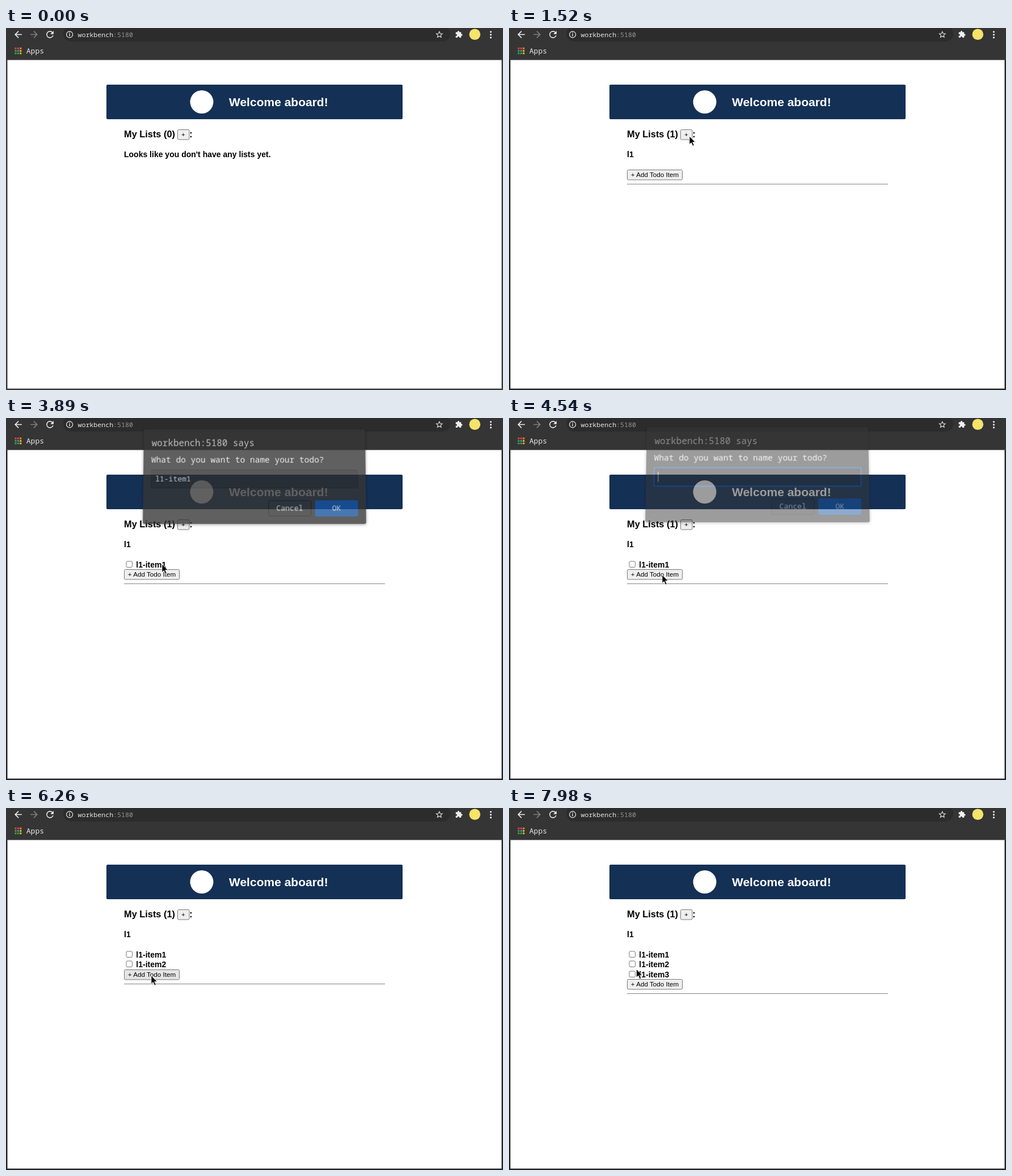
An HTML page that plays this animation: 876x639 px, repeating every 8 s.

```html
<!DOCTYPE html>
<html lang="en">
<head>
<meta charset="utf-8">
<title>Todo lists</title>
<style>
  html, body { margin: 0; width: 100%; height: 100%; overflow: hidden; background: #fff; }
  #stage { position: absolute; inset: 0; overflow: hidden; contain: strict; }
  svg { position: absolute; left: 0; top: 0; display: block; }
  text { white-space: pre; }
  .mono { font-family: "Noto Sans Mono", "DejaVu Sans Mono", monospace; fill: #e8e8e8; }
  .sans { font-family: "Liberation Sans", Arial, sans-serif; }
  .bold { font-weight: bold; font-size: 14px; }
  .h3 { font-size: 16.38px; }
  .label { font-size: 11.67px; text-anchor: middle; }
  .btn { fill: #efefef; stroke: #767676; }
  .box { fill: #fff; stroke: #767676; }
  .small { font-size: 13px; }
  .mid { text-anchor: middle; }
  #dialog { left: 228px; top: 16px; transform-origin: 50% 10px; }
  #panel { filter: drop-shadow(0 1px 2.5px rgba(0,0,0,.5)); }
</style>
</head>
<body>
<div id="stage">
<svg width="876" height="639">
  <rect id="frame" width="876" height="639"/>
  <rect width="876" height="57" fill="#353535"/>
  <rect x="101" y="-4" width="682" height="28" rx="14" fill="#2c2c2c"/>
  <rect x="2.5" y="56.5" width="871" height="580" fill="#fff"/>

  <g fill="#f0f0f0">
    <path transform="translate(11.9 1.9) scale(.8)" d="M20 11H7.8l5.6-5.6L12 4l-8 8 8 8 1.4-1.4L7.8 13H20z"/>
    <path transform="translate(59.1 1.9) scale(-.8 .8)" fill="#808080" d="M20 11H7.8l5.6-5.6L12 4l-8 8 8 8 1.4-1.4L7.8 13H20z"/>
    <path transform="translate(67.9 1.9) scale(.8)" d="M17.65 6.35A8 8 0 0 0 12 4a8 8 0 1 0 7.73 10h-2.08A6 6 0 1 1 12 6c1.66 0 3.14.69 4.22 1.78L13 11h7V4z"/>
    <path d="M111.4 10.5h1.4v4h-1.4zM111.4 8h1.4v1.5h-1.4z"/>
    <path transform="translate(791.5 4.5) scale(.57)" d="M20.5 11H19V7c0-1.1-.9-2-2-2h-4V3.5a2.5 2.5 0 0 0-5 0V5H4c-1.1 0-2 .9-2 2v3.8h1.5a2.7 2.7 0 0 1 0 5.4H2V20c0 1.1.9 2 2 2h3.8v-1.5a2.7 2.7 0 0 1 5.4 0V22H17c1.1 0 2-.9 2-2v-4h1.5a2.5 2.5 0 0 0 0-5z"/>
    <circle cx="854.5" cy="6.8" r="1.6"/><circle cx="854.5" cy="11.8" r="1.6"/><circle cx="854.5" cy="16.8" r="1.6"/>
  </g>
  <g fill="none" stroke="#e0e0e0">
    <circle cx="112.1" cy="11.5" r="5.5" stroke-width="1.3"/>
    <path transform="translate(757.4 5) scale(.53)" stroke-width="2.2" d="M12 2.5l2.9 6.6 7.1.6-5.4 4.7 1.6 7-6.2-3.7-6.2 3.7 1.6-7L2 9.7l7.1-.6z"/>
  </g>
  <circle cx="826.3" cy="11.3" r="9.8" fill="#f5e36a"/>
  <g id="grid"></g>
  <text class="mono" x="126.5" y="15.8" font-size="11.6">workbench<tspan fill="#969696">:5180</tspan></text>
  <text class="mono small" x="35.8" y="45">Apps</text>

  <rect x="177" y="100" width="522" height="61" rx="2" fill="#143055"/>
  <circle cx="345" cy="130.5" r="20.5" fill="#fff"/>
  <text class="sans bold" x="393" y="138" fill="#fff" style="font-size:21px">Welcome aboard!</text>

  <g class="sans">
    <text id="heading" class="bold h3" x="208" y="193"></text>
    <rect class="btn" x="302.5" y="179.5" width="20.5" height="17.5" rx="2"/>
    <text class="label" x="312.5" y="192.3">+</text>
    <text class="bold h3" x="323.2" y="193">:</text>
    <text id="sub" class="bold" x="208" y="228"></text>
    <g id="items"></g>
    <g id="footer">
      <rect id="add" class="btn" x="208.5" y="250.5" width="97" height="17.5" rx="2"/>
      <text class="label" x="257" y="263">+ Add Todo Item</text>
      <rect x="208" y="275" width="460" height="1.1" fill="#8c8c8c"/>
    </g>
  </g>
</svg>

<svg id="dialog" width="420" height="190" viewBox="228 16 420 190">
  <rect id="panel" x="243" y="26" width="390" height="166" rx="3" fill="#343434"/>
  <text class="mono" x="257" y="56" font-size="15.9">workbench:5180 says</text>
  <text id="prompt" class="mono" x="256.5" y="85" font-size="14.48"></text>
  <rect id="input" x="257" y="97.5" width="362" height="32" rx="2" fill="#2c2c2c"/>
  <text id="value" class="mono small" x="264" y="118"></text>
  <rect id="caret" y="104.5" width="1" height="17.5" fill="#fff"/>
  <rect x="462.5" y="151.5" width="74.5" height="27" rx="3" fill="#333" stroke="#1b1b1b"/>
  <text class="mono small mid" x="499.5" y="169">Cancel</text>
  <rect x="544" y="151" width="75" height="28" rx="3" fill="#15539e"/>
  <text class="mono small mid" x="581.5" y="169">OK</text>
</svg>

<svg width="876" height="639">
  <path id="cursor" d="M0 0V14.5L3.3 11.4 5.9 17.2 8.3 16.1 5.7 10.4H10.3Z" fill="#000" stroke="#fff" stroke-width=".8"/>
</svg>
</div>

<script>
const LOOP = 8000;
const $ = id => document.getElementById(id);
const clamp = (v, a, b) => Math.min(b, Math.max(a, v));
const rowOffset = n => Math.floor(n * 17.5);

// Each prompt: opening start, closing start, entered text, key times
const prompts = [
  { kind: 'list', open: 600, close: 1290, text: 'l1', keys: [960, 1100] },
  { kind: 'todo', open: 2462, close: 3840, text: 'l1-item1', keys: [2840, 3050, 3250, 3420, 3480, 3540, 3590, 3650] },
  { kind: 'todo', open: 4495, close: 5660, text: 'l1-item2', keys: [4720, 4860, 5010, 5210, 5270, 5330, 5400, 5460] },
  { kind: 'todo', open: 6290, close: 7348, text: 'l1-item3', keys: [6490, 6600, 6710, 6880, 6920, 6970, 7010, 7210] }
];
const SPEED = 0.0125, HIDDEN = 1.56, SAVE_DELAY = 40;

// Pointer moves: start, end, x, y reached
const moves = [
  [0, 170, 470, 660],
  [170, 570, 318, 191],
  [2220, 2450, 275, 258],
  [4350, 4480, 270, 277],
  [6000, 6260, 256, 296],
  [7860, 7980, 224.5, 284.5]
];

const colors = ['#ea4335', '#ea4335', '#f08a24', '#34a853', '#4285f4', '#fbbc05', '#34a853', '#34a853', '#fbbc05'];
$('grid').innerHTML = colors.map((c, i) =>
  `<rect x="${15.5 + i % 3 * 4.4}" y="${34.5 + (i / 3 | 0) * 4.4}" width="3" height="3" fill="${c}"/>`).join('');

$('items').innerHTML = prompts.slice(1).map((p, i) =>
  `<g transform="translate(0 ${rowOffset(i)})"><rect class="box" x="212" y="253" width="10.5" height="10.5" rx="2"/>
  <text class="bold" x="229.3" y="264">${p.text}</text></g>`).join('');

function pointer(t) {
  let [, , x, y] = moves[0];
  for (const [a, b, tx, ty] of moves.slice(1)) {
    const p = clamp((t - a) / (b - a), 0, 1), e = p * p * (3 - 2 * p);
    x += (tx - x) * e;
    y += (ty - y) * e;
  }
  return [x, y];
}

function drawDialog(t) {
  const p = prompts.find(p => t >= p.open && t < p.close + HIDDEN / SPEED);
  $('dialog').style.display = p ? '' : 'none';
  if (!p) return;
  const closing = t >= p.close;
  const tilt = closing ? (t - p.close) * SPEED : Math.max(0, HIDDEN - (t - p.open) * SPEED);
  $('dialog').style.opacity = clamp(1.33 - 0.85 * tilt, 0, 1);
  $('dialog').style.transform = tilt
    ? `translateY(${-10 * tilt}px) perspective(1000px) rotateX(${5 * tilt}deg)` : 'none';
  const typed = p.keys.filter(k => t >= k).length;
  $('prompt').textContent = `What do you want to name your ${p.kind}?`;
  $('value').textContent = p.text.slice(0, typed);
  $('caret').setAttribute('x', 263.7 + typed * 7.8);
  $('caret').style.display = closing ? 'none' : '';
  $('input').setAttribute('stroke', closing ? '#222' : '#1a57a6');
  $('input').setAttribute('stroke-width', closing ? 1 : 2);
}

function draw(t) {
  const saved = prompts.filter(p => t >= p.close + SAVE_DELAY).length;
  const hasList = saved > 0, count = Math.max(0, saved - 1);
  $('frame').setAttribute('fill', t < 170 ? '#3a3a3a' : '#242424');
  $('heading').textContent = `My Lists (${hasList ? 1 : 0})`;
  $('sub').textContent = hasList ? 'l1' : "Looks like you don't have any lists yet.";
  [...$('items').children].forEach((g, i) => g.style.display = i < count ? '' : 'none');
  $('footer').style.display = hasList ? '' : 'none';
  $('footer').setAttribute('transform', `translate(0 ${rowOffset(count)})`);
  $('add').style.fill = t > 5660 && t < 7900 ? '#e5e5e5' : '#efefef';
  drawDialog(t);
  $('cursor').setAttribute('transform', `translate(${pointer(t)})`);
}

const start = performance.now();
function tick() {
  draw((performance.now() - start) % LOOP);
  requestAnimationFrame(tick);
}
tick();
</script>
</body>
</html>
```
